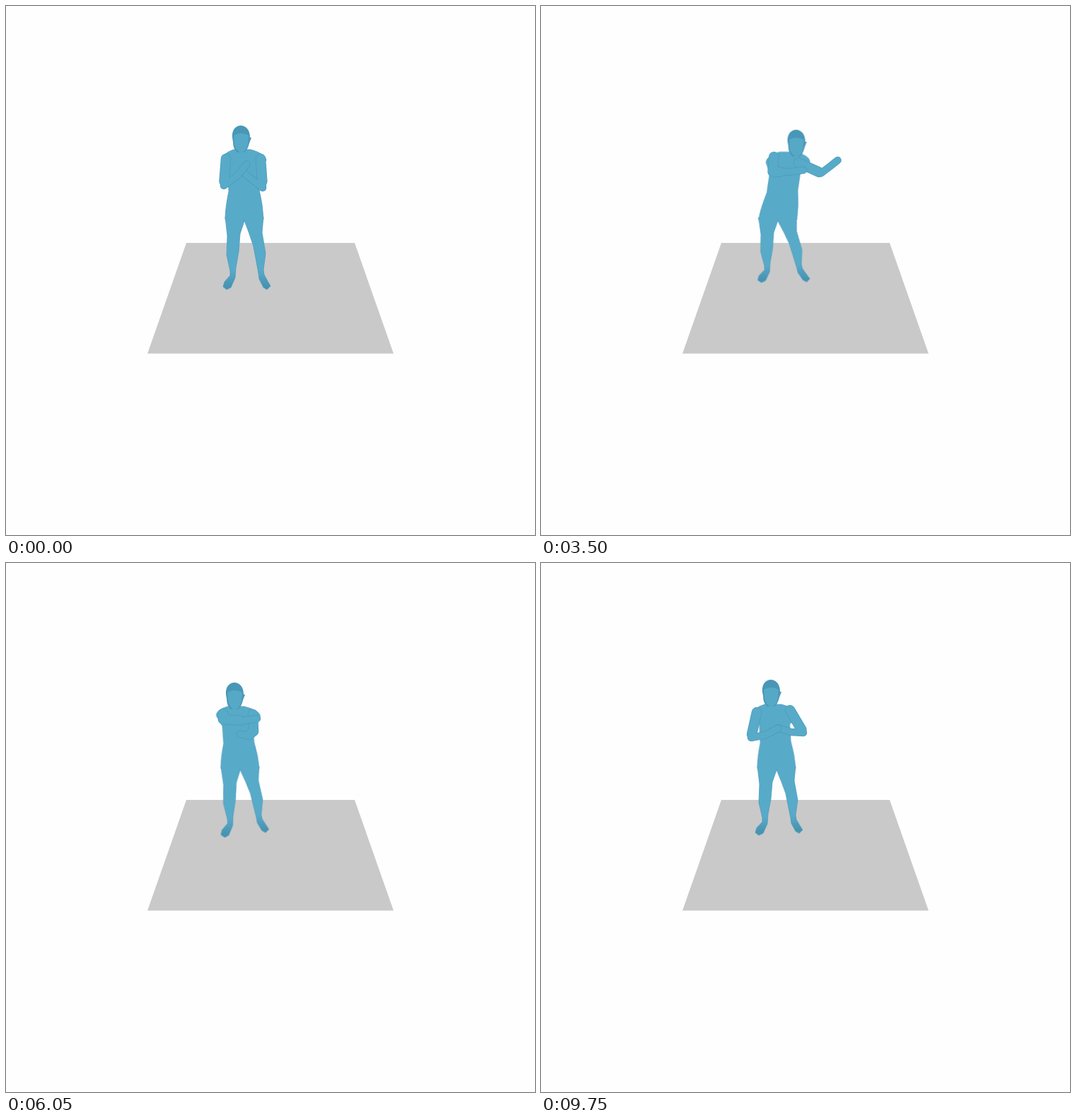
Animation of 748 by 748 pixels, one loop 9800 ms. Source, as an HTML page without scripts:

```html
<!DOCTYPE html>
<html lang="en">
<head>
<meta charset="utf-8">
<title>Figure on a floor</title>
<style>
html, body { margin: 0; height: 100%; overflow: hidden; background: #fefefe; }
svg { display: block; width: 100vw; height: 100vh; }

.shift, .lean, .arm path { animation: shift 9.8s linear infinite; }
.lean { animation-name: lean; stroke: #4c9bba; stroke-width: .8; stroke-linejoin: round; }
.arm path { animation-name: bend; fill: none; stroke: #58aac9; stroke-width: 9; stroke-linecap: round; stroke-linejoin: round; }
.arm .upper { stroke-width: 13; stroke-dasharray: 32 300; }
.arm .edge { stroke: #4c9bba; stroke-width: 10.5; }
.arm .edge.upper { stroke-width: 14.5; }

/* Each part names its own poses; the three timelines below are shared. */
@keyframes shift {
  0% { transform: translate(var(--rest)); }
  18%, 23% { transform: translate(var(--chin)); }
  29%, 31% { transform: translate(var(--aim)); }
  39%, 42% { transform: translate(var(--swing)); }
  51%, 63% { transform: translate(var(--cross)); }
  72%, 84% { transform: translate(var(--talk)); }
  99.5%, 100% { transform: translate(var(--clasp)); }
}
@keyframes lean {
  0% { transform: matrix(1, 0, var(--rest), 0, 0); }
  18%, 23% { transform: matrix(1, 0, var(--chin), 0, 0); }
  29%, 31% { transform: matrix(1, 0, var(--aim), 0, 0); }
  39%, 42% { transform: matrix(1, 0, var(--swing), 0, 0); }
  51%, 63% { transform: matrix(1, 0, var(--cross), 0, 0); }
  72%, 84% { transform: matrix(1, 0, var(--talk), 0, 0); }
  99.5%, 100% { transform: matrix(1, 0, var(--clasp), 0, 0); }
}
@keyframes bend {
  0% { d: var(--rest); }
  18%, 23% { d: var(--chin); }
  29%, 31% { d: var(--aim); }
  39% { d: var(--reach, var(--swing)); }
  41.8% { d: var(--swing); }
  44% { d: var(--high, var(--swing)); }
  51%, 63% { d: var(--cross); }
  72%, 84% { d: var(--talk); }
  99.5%, 100% { d: var(--clasp); }
}

#hips {
  --rest: 337px, 302px; --chin: 338px, 300px; --aim: 337px, 297px; --swing: 333px, 306px;
  --cross: 331px, 291px; --talk: 333px, 289px; --clasp: 333px, 291px;
}
#head {
  --rest: 332px, 188px; --chin: 332px, 187px; --aim: 350px, 191px; --swing: 368px, 196px;
  --cross: 323px, 188px; --talk: 323px, 188px; --clasp: 325px, 184px;
}
/* sideways slant, height */
#torso { --rest: 0, 1; --chin: 0, .98; --aim: -.15, .92; --swing: -.19, 1; --cross: .03, .89; --talk: .04, .88; --clasp: .02, .92; }
#leg-left { --rest: 0, 1; --chin: -.01, .98; --aim: -.03, .95; --swing: .05, .86; --cross: .03, .98; --talk: .06, .96; --clasp: 0, .95; }
#leg-right { --rest: 0, 1; --chin: -.01, .98; --aim: .04, .97; --swing: .12, .83; --cross: .04, .91; --talk: -.02, .92; --clasp: 0, .92; }
/* shoulder, elbow, wrist, fingertips */
#arm-left {
  --rest: path("M311 216L308 254 327 240 340 224");
  --chin: path("M310 215L306 253 324 234 337 217");
  --aim: path("M321 215L317 249 337 234 351 215");
  --swing: path("M335 212L335 224 362 235 385 244");
  --cross: path("M307 213L307 221 335 223 355 220");
  --talk: path("M304 213L295 247 316 244 331 237");
  --clasp: path("M305 211L297 247 318 243 335 234");
}
#arm-right {
  --rest: path("M360 216L363 257 345 243 335 235");
  --chin: path("M361 215L365 254 350 234 340 215");
  --aim: path("M367 218L376 257 368 236 367 217");
  --reach: path("M362 224L410 222 440 218 456 219");
  --swing: path("M362 231L400 231 412 203 419 181");
  --high: path("M362 220L392 198 398 165 402 143");
  --cross: path("M349 214L350 238 342 244 331 242");
  --talk: path("M351 209L372 240 355 236 341 230");
  --clasp: path("M352 208L371 240 353 239 335 233");
}
</style>
</head>
<body>
<svg viewBox="0 0 748 748">
  <defs>
    <linearGradient id="shin" gradientUnits="userSpaceOnUse" x1="0" y1="72" x2="0" y2="94">
      <stop stop-color="#58aac9"/>
      <stop offset="1" stop-color="#4793b1"/>
    </linearGradient>
  </defs>
  <path fill="#c9c9c9" d="M255 335H493L548 491.5H200Z"/>
  <g id="hips" class="shift">
    <path id="leg-left" class="lean" fill="url(#shin)" d="M2-4L-6 20-8 45-12 68-13 82-19 96-25 99-30 95-28 88-20 79-20 73-25 50-24 23-27-4"/>
    <path id="leg-right" class="lean" fill="url(#shin)" d="M-2-4L7 20 13 38 20 76 21 84 27 96 32 99 37 94 33 87 28 78 27 71 30 48 25 18 27-4"/>
    <path id="torso" class="lean" fill="#58aac9" d="M-27 0Q-27-16-22-40L-23-68-31-84Q-32-93-15-99H9Q30-93 31-84L20-68 21-42Q26-22 27 0"/>
  </g>
  <g id="head" class="shift">
    <path fill="#4997b6" d="M-12-2C-13-14-6-19 0-19S13-14 13-2H15L12 6Q10 15 5 19H-5Q-11 14-11 4Z"/>
    <path fill="#56a8c7" d="M-10-5Q0-11 11-5L10 8Q7 18 1 20-6 18-9 8Z"/>
  </g>
  <g id="arm-right" class="arm">
    <path class="edge"/><path class="edge upper"/><path/><path class="upper"/>
  </g>
  <g id="arm-left" class="arm">
    <path class="edge"/><path class="edge upper"/><path/><path class="upper"/>
  </g>
</svg>
</body>
</html>
```
